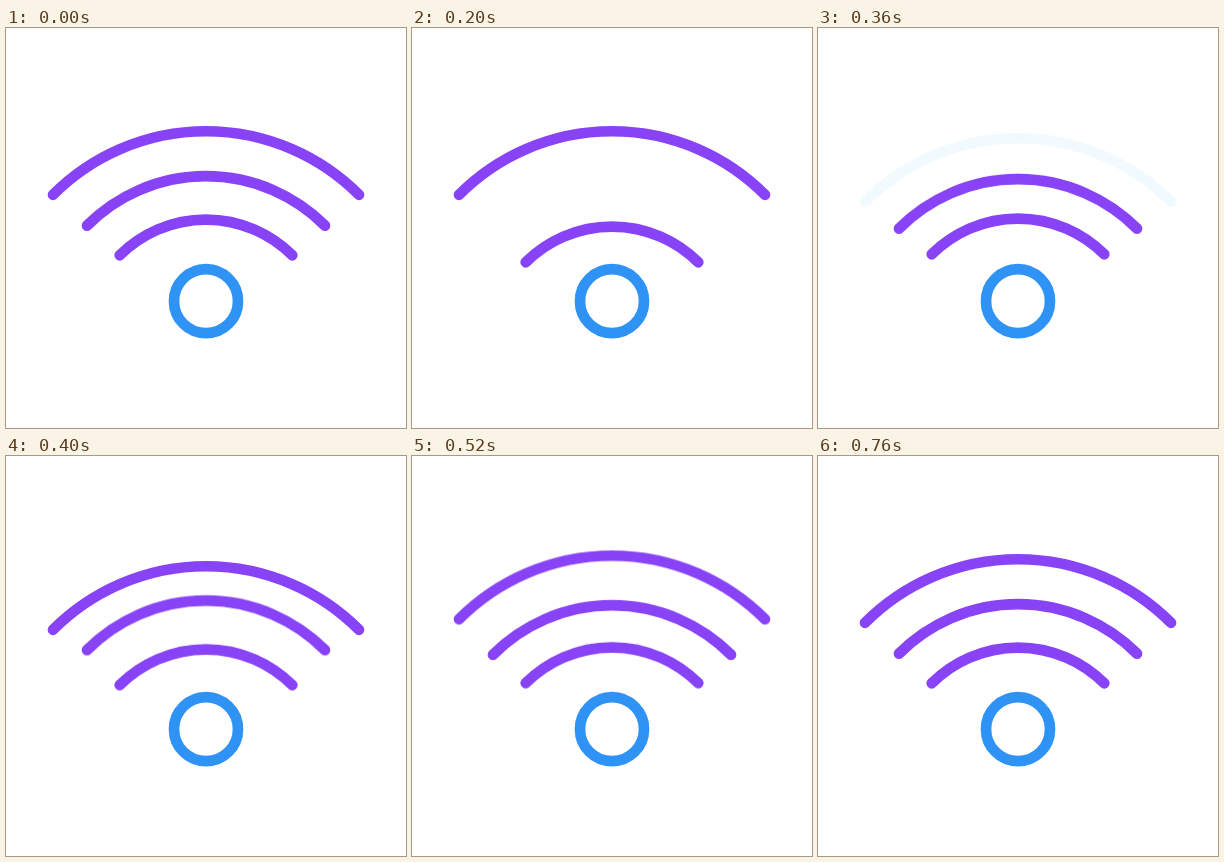
Recreate the animation shown at these times as an HTML page. Size 400 by 400 pixels, loop 840 ms.

```html
<!DOCTYPE html>
<html lang="en">
<head>
<meta charset="utf-8">
<title>Signal</title>
<style>
html, body { margin: 0; width: 100%; height: 100%; overflow: hidden; background: #fff; }
svg { display: block; width: 100%; height: 100%; fill: none; stroke-width: 10.7; stroke-linecap: round; }
.dot { stroke: #2f93f6; }
.arc { stroke: #8843f7; animation: hop 840ms step-end infinite; }
.mid { animation-delay: -120ms; }
.inner { animation-delay: -200ms; }

/* Dip, blink, then spring back to rest; one step is 40 ms. */
@keyframes hop {
  0% { transform: translateY(0); }
  28.57% { transform: translateY(6px); }
  33.33% { transform: translateY(7px); stroke: #8843f7; }
  38.09% { transform: translateY(7px); stroke: #fff; }
  42.85% { transform: translateY(7px); stroke: #f0faff; }
  47.61% { transform: translateY(7px); stroke: #8843f7; }
  52.38% { transform: translateY(6px); }
  57.14% { transform: translateY(2.9px); }
  61.90% { transform: translateY(-3.6px); }
  66.66% { transform: translateY(-1px); }
  71.42% { transform: translateY(1.8px); }
  76.19% { transform: translateY(1.1px); }
  80.95% { transform: translateY(.4px); }
  85.71% { transform: translateY(-.2px); }
  90.47%, 100% { transform: translateY(0); }
}
</style>
</head>
<body>
<svg viewBox="0 0 400 400">
  <path class="arc" d="M47 166.8A216 216 0 0 1 353 166.8"/>
  <path class="arc mid" d="M81 197.6A168 168 0 0 1 319 197.6"/>
  <path class="arc inner" d="M113.7 227.3A122 122 0 0 1 286.3 227.3"/>
  <circle class="dot" cx="200" cy="273.2" r="32"/>
</svg>
</body>
</html>
```
